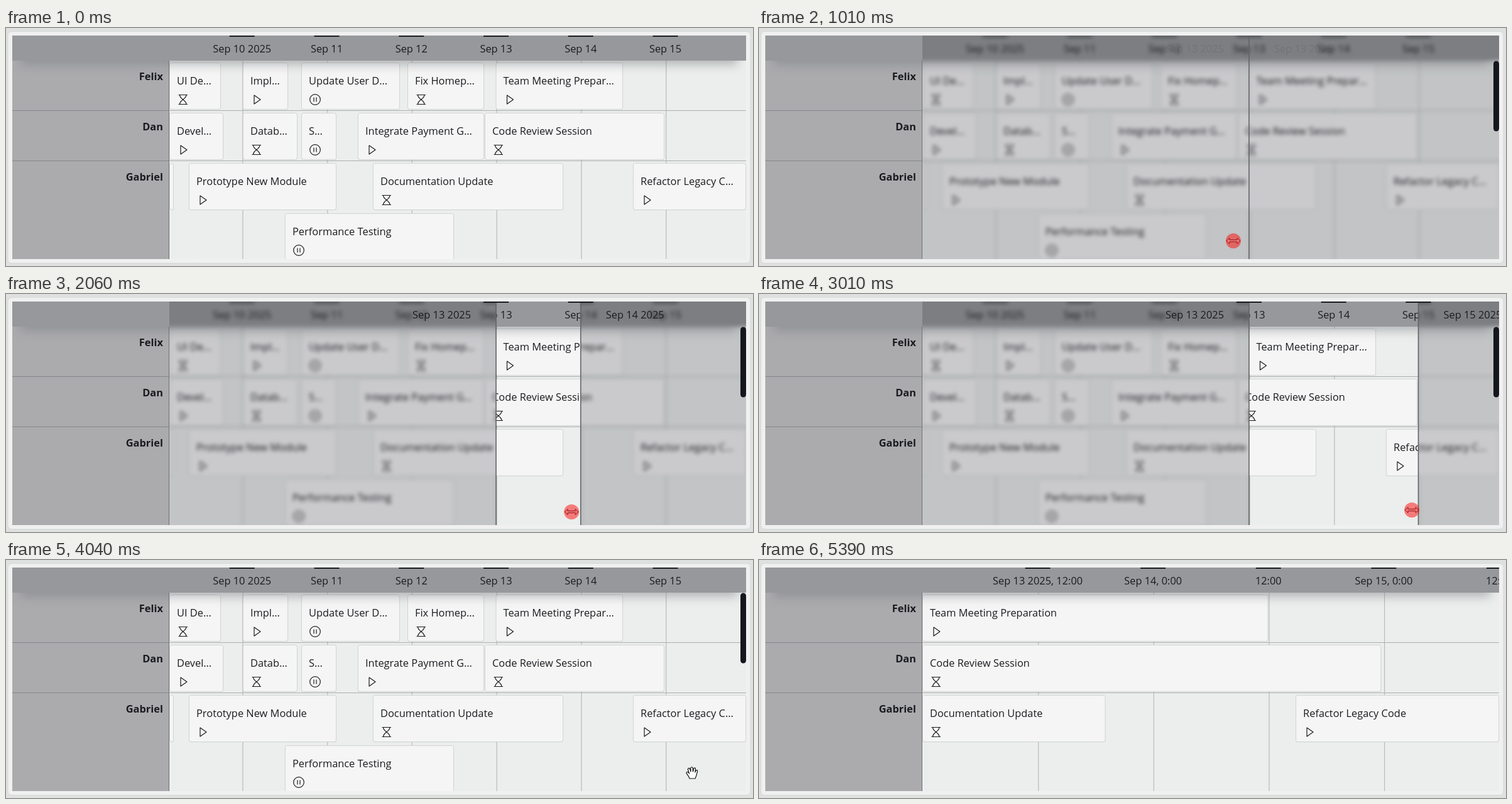
An HTML page with a canvas that plays this animation: 1189 by 379 pixels, repeating every 6980 ms.

```html
<!DOCTYPE html>
<html lang="en">
<head>
<meta charset="utf-8">
<title>Schedule zoom</title>
<style>
html, body { margin: 0; width: 100%; height: 100%; overflow: hidden; background: #dfe0e0; }
canvas { display: block; }
</style>
</head>
<body>
<canvas id="stage" width="1189" height="379"></canvas>
<script>
const W = 1189, H = 379, LOOP = 6980;
const LEFT = 260, RIGHT = 1178, TOP = 12, HEAD = 52, BOTTOM = 368;
const ANCHOR = 780, DAY = 134.75;          // Sep 13 and pixels per day before zooming
const ZOOM_END = ANCHOR + DAY * 2.5;
const FONT = '16.4px "Open Sans", "Noto Sans", sans-serif';
const INK = '#1b1c20';

const ctx = document.getElementById('stage').getContext('2d');
const layer = document.createElement('canvas');
layer.width = W;
layer.height = H;
const chartCtx = layer.getContext('2d');

const PEOPLE = [['Felix', 83], ['Dan', 163], ['Gabriel', 243]];

// [left, right, top, icon, title]
const CARDS = [
  [200, 342, 55, 'wait', 'UI Design Review'],
  [377, 449, 55, 'play', 'Implement Login'],
  [470, 627, 55, 'pause', 'Update User Database'],
  [639, 761, 55, 'wait', 'Fix Homepage Bugs'],
  [779.5, 982, 55, 'play', 'Team Meeting Preparation'],
  [200, 346, 135, 'play', 'Develop Interface'],
  [377, 464, 135, 'wait', 'Database Backup'],
  [470, 526, 135, 'pause', 'Smoke Tests'],
  [560, 761, 135, 'play', 'Integrate Payment Gateway'],
  [762, 1048, 135, 'wait', 'Code Review Session'],
  [200, 267, 215, 'play', ''],
  [291, 526, 215, 'play', 'Prototype New Module'],
  [584, 887, 215, 'wait', 'Documentation Update'],
  [998, 1230, 215, 'play', 'Refactor Legacy Code'],
  [444, 713, 295, 'pause', 'Performance Testing']
];

// Drag path: [time, x, y]
const PATH = [
  [470, 778, 392], [810, 755, 339], [1080, 755, 339], [2060, 900, 347],
  [3010, 1039, 344], [3640, 1093, 341], [4040, 1092, 339],
  [5180, 1092, 339], [5380, 1098, 394]
];

const clamp = v => Math.max(0, Math.min(1, v));
const ramp = (t, a, b) => clamp((t - a) / (b - a));
const mix = (a, b, p) => a + (b - a) * p;
const ease = p => p < .5 ? 4 * p ** 3 : 1 - (2 - 2 * p) ** 3 / 2;

function rect(c, color, x, y, w, h) {
  c.fillStyle = color;
  c.fillRect(x, y, w, h);
}

function rounded(c, x, y, w, h, r) {
  c.beginPath();
  c.roundRect(x, y, w, h, r);
}

function text(c, str, x, y, align = 'left', weight = '') {
  c.font = weight + ' ' + FONT;
  c.textAlign = align;
  c.fillStyle = INK;
  c.fillText(str, x, y);
}

function clipTo(c, x, y, w, h, draw) {
  c.save();
  c.beginPath();
  c.rect(x, y, w, h);
  c.clip();
  draw();
  c.restore();
}

function fit(c, str, width) {
  c.font = FONT;
  if (c.measureText(str).width <= width) return str;
  for (let n = str.length - 1; n > 0; n--) {
    const cut = str.slice(0, n).trimEnd() + '…';
    if (c.measureText(cut).width <= width) return cut;
  }
  return '';
}

function icon(c, kind, x, y) {
  c.strokeStyle = INK;
  c.lineWidth = 1.2;
  c.lineJoin = 'round';
  c.beginPath();
  if (kind === 'play') {
    c.moveTo(x + 6, y - 7);
    c.lineTo(x + 16, y);
    c.lineTo(x + 6, y + 7);
    c.closePath();
  } else if (kind === 'pause') {
    c.arc(x + 10, y, 8.3, 0, Math.PI * 2);
    for (const dx of [8, 12]) {
      c.moveTo(x + dx, y - 3.5);
      c.lineTo(x + dx, y + 3.5);
    }
  } else {
    for (const s of [-1, 1]) {
      c.moveTo(x + 2.5, y + 7.5 * s);
      c.lineTo(x + 17, y + 7.5 * s);
      c.moveTo(x + 4.5, y + 7.5 * s);
      c.quadraticCurveTo(x + 4.5, y + 4 * s, x + 9.7, y);
      c.quadraticCurveTo(x + 15, y + 4 * s, x + 15, y + 7.5 * s);
    }
  }
  c.stroke();
}

function card(c, [a, b, y, kind, title], toX) {
  const x1 = Math.max(LEFT, toX(a)), x2 = Math.min(RIGHT, toX(b));
  if (x2 <= x1) return;
  c.save();
  c.shadowColor = 'rgba(0,0,0,.15)';
  c.shadowBlur = 1;
  c.shadowOffsetY = .6;
  rounded(c, x1 + .5, y + .5, x2 - x1 - 1, 74, 3);
  c.fillStyle = '#f5f5f5';
  c.fill();
  c.restore();
  c.strokeStyle = '#d2d4d3';
  c.lineWidth = 1;
  c.stroke();
  const label = fit(c, title, x2 - x1 - 23);
  if (!label) return;
  text(c, label, x1 + 12, y + 35);
  icon(c, kind, x1 + 12, y + 59);
}

function headerBar(c) {
  clipTo(c, 0, HEAD, W, 60, () => {
    c.shadowColor = 'rgba(120,122,130,.5)';
    c.shadowBlur = 16;
    c.shadowOffsetY = 6;
    rect(c, '#97989b', 24, TOP, 1140, HEAD - TOP);
  });
  rect(c, '#97989b', 0, 0, W, HEAD);
}

const tickMark = (c, x) => rect(c, INK, x - 20, TOP, 40, 2);

function ticks(toX) {
  const halves = toX(ANCHOR + DAY) - toX(ANCHOR) > 240;
  const list = [];
  for (let d = 10; d <= 16; d += halves ? .5 : 1) {
    const x = toX(ANCHOR + (d - 13) * DAY);
    if (x < LEFT + 1 || x > RIGHT + .5) continue;
    const noon = d % 1 !== 0;
    let name = 'Sep ' + Math.floor(d) + (list.length ? '' : ' 2025');
    if (halves) name = noon && list.length ? '12:00' : name + (noon ? ', 12:00' : ', 0:00');
    list.push({ x, name });
  }
  return list;
}

function drawChart(c, zoom) {
  const start = mix(LEFT, ANCHOR, zoom), end = mix(RIGHT, ZOOM_END, zoom);
  const toX = x => LEFT + (x - start) * (RIGHT - LEFT) / (end - start);
  const marks = ticks(toX);
  rect(c, '#ebeeec', 0, 0, W, H);
  for (const m of marks) rect(c, '#b9bbba', m.x + .6, HEAD, 1.2, H - HEAD);
  for (const y of [131, 211]) rect(c, '#acaead', 0, y, W, 1);
  for (const item of CARDS) card(c, item, toX);
  headerBar(c);
  for (const m of marks) {
    tickMark(c, m.x);
    text(c, m.name, m.x, 39, 'center');
  }
}

function drawPeople(c) {
  clipTo(c, 10, TOP, LEFT - 10, BOTTOM - TOP, () => {
    rect(c, '#ababad', 10, HEAD, LEFT - 10, BOTTOM - HEAD);
    for (const y of [131, 211]) rect(c, '#858689', 10, y, LEFT - 10, 1);
    for (const [name, y] of PEOPLE) text(c, name, 250, y, 'right', 'bold');
    headerBar(c);
    rect(c, '#707174', 259, HEAD, 1, BOTTOM - HEAD);
  });
}

function veil(c, x1, x2) {
  clipTo(c, x1, TOP, x2 - x1, BOTTOM - TOP, () => {
    c.filter = 'blur(3.4px)';
    c.drawImage(layer, 0, 0);
    c.filter = 'none';
    rect(c, 'rgba(8,8,18,.18)', x1, TOP, x2 - x1, BOTTOM - TOP);
  });
}

function drawSelection(c, t, cursorX) {
  const step = Math.max(0, Math.round((cursorX - ANCHOR) / (DAY / 2)));
  const edge = ANCHOR + step * DAY / 2;
  const byDay = step % 2 === 0;
  veil(c, LEFT, ANCHOR);
  veil(c, ANCHOR, RIGHT);
  if (step) clipTo(c, ANCHOR, TOP, edge - ANCHOR, BOTTOM - TOP, () => c.drawImage(layer, 0, 0));
  for (const x of new Set([ANCHOR, edge])) rect(c, '#626367', x - .8, TOP, 1.6, BOTTOM - TOP);
  c.globalAlpha = mix(.1, 1, ramp(t, 1080, 1360));
  for (const x of new Set([ANCHOR, edge])) tickMark(c, x);
  text(c, byDay ? 'Sep 13 2025' : '0:00', ANCHOR - 40, 39, 'right');
  text(c, byDay ? `Sep ${13 + step / 2} 2025` : '12:00', edge + 40, 39);
  c.globalAlpha = 1;
}

function cursorAt(t) {
  let i = 0;
  while (i < PATH.length - 2 && t >= PATH[i + 1][0]) i++;
  const [t0, x0, y0] = PATH[i], [t1, x1, y1] = PATH[i + 1];
  const p = ramp(t, t0, t1);
  return [mix(x0, x1, p), mix(y0, y1, p)];
}

function resizeCursor(c, x, y) {
  c.beginPath();
  for (const [dx, dy] of [[-11, 0], [-6, -4.5], [-6, -1.5], [6, -1.5], [6, -4.5],
    [11, 0], [6, 4.5], [6, 1.5], [-6, 1.5], [-6, 4.5]]) c.lineTo(x + dx, y + dy);
  c.closePath();
  c.fillStyle = '#e6e6e6';
  c.fill();
  c.strokeStyle = '#222';
  c.lineWidth = 1;
  c.stroke();
  c.fillStyle = 'rgba(255,8,8,.5)';
  c.beginPath();
  c.arc(x, y, 12, 0, Math.PI * 2);
  c.fill();
}

function handCursor(c, x, y) {
  c.save();
  c.translate(x, y);
  c.beginPath();
  c.moveTo(-4, 9);
  c.bezierCurveTo(-5, 5, -8, 3, -9, 0);
  c.bezierCurveTo(-9, -2, -6, -2, -4.5, 1);
  c.lineTo(-6.5, -5);
  c.bezierCurveTo(-7, -8, -4, -8.5, -3.2, -5.5);
  c.lineTo(-2, -2);
  c.lineTo(-2.3, -7);
  c.bezierCurveTo(-2, -10, 1, -10, 1.2, -7);
  c.lineTo(1.4, -2);
  c.lineTo(2.6, -6.5);
  c.bezierCurveTo(3.5, -9, 6, -8, 5.4, -5.5);
  c.lineTo(4.8, -1);
  c.lineTo(6, -3.5);
  c.bezierCurveTo(7.5, -5.5, 9.2, -4, 8.5, -2);
  c.bezierCurveTo(7.5, 2, 7, 5, 5, 9);
  c.closePath();
  c.fillStyle = '#fff';
  c.fill();
  c.strokeStyle = '#111';
  c.lineWidth = 1.2;
  c.lineJoin = 'round';
  c.stroke();
  c.restore();
}

function drawScrollbar(c, alpha) {
  if (alpha <= 0) return;
  c.globalAlpha = alpha;
  rounded(c, 1169, 52.5, 9, 112, 4.5);
  c.fillStyle = '#15171f';
  c.fill();
  c.globalAlpha = 1;
}

function render(t) {
  const dragging = t >= 1010 && t < 4040;
  const [cx, cy] = cursorAt(t);
  drawChart(chartCtx, ease(ramp(t, 4105, 4520)));

  rect(ctx, '#dfe0e0', 0, 0, W, H);
  rounded(ctx, 3, 5.5, 1182, 369, 6);
  ctx.fillStyle = '#f0f0f0';
  ctx.fill();
  ctx.strokeStyle = '#d6d7d7';
  ctx.lineWidth = 1;
  ctx.stroke();

  clipTo(ctx, 10, TOP, RIGHT - 10, BOTTOM - TOP, () => {
    ctx.drawImage(layer, 0, 0);
    if (dragging) drawSelection(ctx, t, cx);
    drawPeople(ctx);
    drawScrollbar(ctx, ramp(t, 400, 670) - ramp(t, 5180, 5380));
  });

  if (dragging) resizeCursor(ctx, cx, cy);
  else if (t >= 470 && t < 5380) handCursor(ctx, cx, cy);
}

const begin = performance.now();
function tick() {
  render((performance.now() - begin) % LOOP);
  requestAnimationFrame(tick);
}
tick();
</script>
</body>
</html>
```
